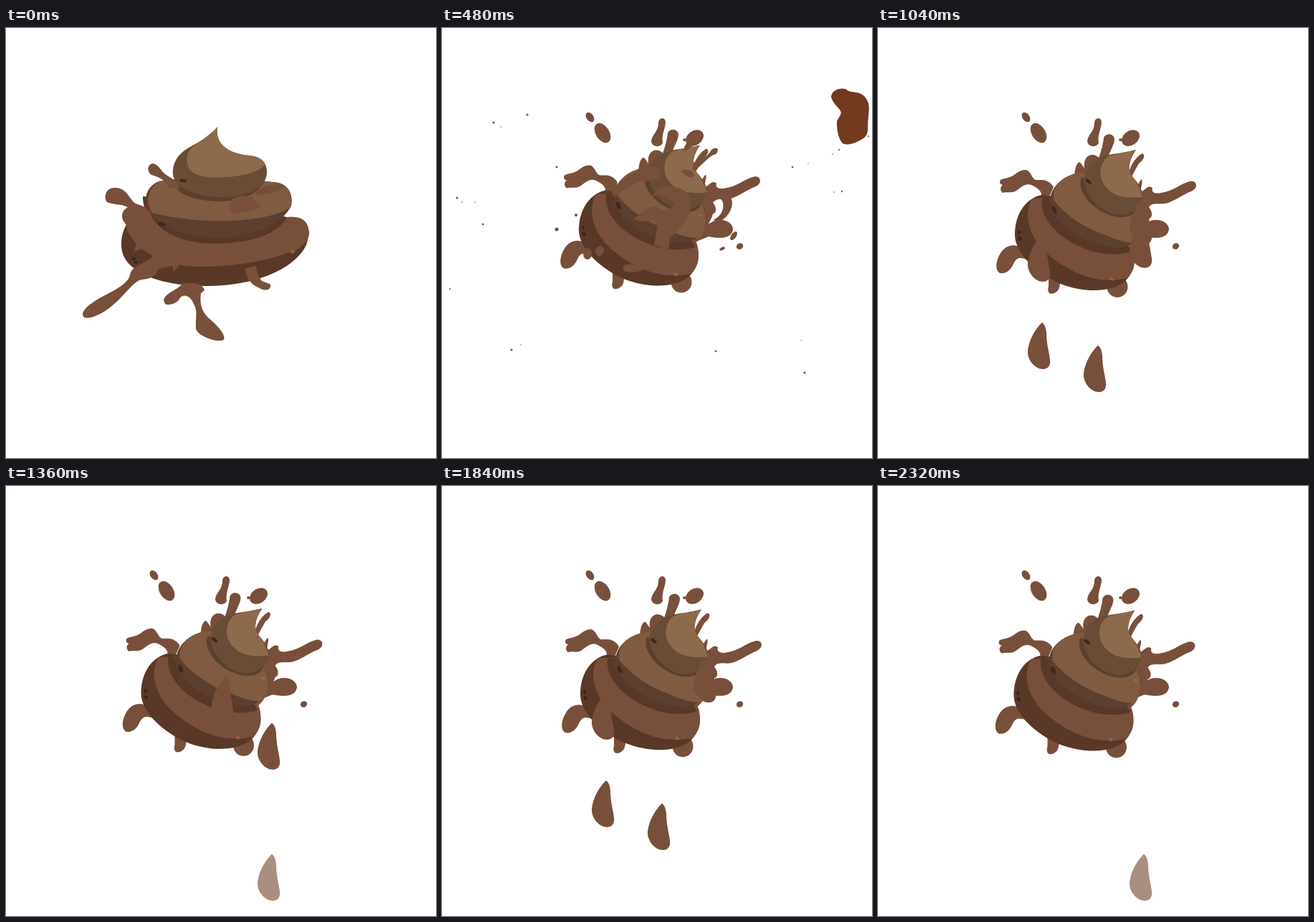
Write an HTML page that moves like this. It is 600 by 600 pixels and loops after 2400 ms.

```html
<!DOCTYPE html>
<html lang="en">
<head>
<meta charset="utf-8">
<title>Splat</title>
<style>
html, body { margin: 0; width: 100%; height: 100%; overflow: hidden; background: #fff; }
svg { display: block; width: 100vw; height: 100vh; }
</style>
</head>
<body>
<svg id="stage" viewBox="0 0 600 600"></svg>
<script>
const LOOP = 2400, STEP = 80;
const MUD = '#784f3a';
const stage = document.getElementById('stage');

function add(parent, tag, attrs) {
  const el = document.createElementNS('http://www.w3.org/2000/svg', tag);
  for (const key in attrs) el.setAttribute(key, attrs[key]);
  parent.appendChild(el);
  return el;
}
const group = (parent, fill = MUD) => add(parent, 'g', { fill });
const path = (parent, d, fill) => add(parent, 'path', fill ? { d, fill } : { d });
const oval = (parent, cx, cy, rx, ry, turn = 0) =>
  add(parent, 'ellipse', { cx, cy, rx, ry, transform: `rotate(${turn} ${cx} ${cy})` });
const clamp = v => Math.max(0, Math.min(1, v));
const span = (t, a, b) => clamp((t - a) / (b - a));
const easeOut = v => 1 - (1 - v) ** 3;
const lerp = (a, b, k) => a + (b - a) * k;
const show = (el, on) => el.setAttribute('display', on ? 'inline' : 'none');

// Interpolates two path strings of the same structure.
function mix(a, b, k) {
  const to = b.match(/-?[\d.]+/g);
  let i = 0;
  return a.replace(/-?[\d.]+/g, n => lerp(+n, +to[i++], k).toFixed(1));
}
const grow = (x, y, s) => `translate(${x} ${y}) scale(${s}) translate(${-x} ${-y})`;

// Splash behind the pile: parts that stay and parts that slide with it.
const fixed = group(stage);
oval(fixed, 206.5, 124.5, 5, 7.5, -35);
oval(fixed, 224, 146.5, 9.5, 15, -32);
path(fixed, 'M302 132C303 124 312 124 312 132C311 142 306 150 308 160C306 167 293 167 292 158C293 148 302 145 302 132Z');
oval(fixed, 352.5, 153.5, 13.5, 10, -35);
oval(fixed, 338.5, 156, 2.5, 2);
oval(fixed, 415.5, 304.5, 4.8, 4.2, -30);
path(fixed, 'M350 276C362 276 372 274 378 270C390 264 406 270 406 281C404 295 386 294 372 291L350 300Z');

const limbs = group(stage);
[
  'M171 212C177 209 183 210 190 205C196 200 204 196 209 199C214 203 215 210 220 212C228 212 238 210 245 222L238 238L228 235C229 227 222 223 214 219C206 216 200 222 193 227C187 231 178 228 174 230C170 227 170 222 174 219C170 218 169 215 171 212Z',
  'M315 153C318 146 329 147 330 155C330 164 322 172 320 186L307 184C311 174 314 162 315 153Z',
  'M274 206C275 196 276 190 281 187C284 189 286 193 288 196C286 184 292 176 300 177C308 178 312 184 310 192L295 212Z',
  'M350 203C352 190 362 178 369 175C374 177 370 185 365 188C360 195 356 205 352 210Z',
  'M355 230C362 222 364 214 368 211C370 216 366 222 367 228C374 226 376 218 383 223C381 229 386 232 395 230C412 228 422 217 435 214C446 212 447 224 437 228C424 233 412 243 400 245C390 246 382 243 378 250C383 256 384 264 378 266C376 275 368 284 360 300L350 310Z',
  'M199 306C189 300 177 304 171 314C164 325 163 338 170 342C180 344 186 336 190 327C194 320 200 320 207 323Z',
  'M238 345L256 352C252 358 256 365 246 370C238 373 236 367 238 360Z'
].forEach(d => path(limbs, d));
oval(limbs, 334, 361, 14.5, 15);

// Pile: [fill, upright shape, tilted shape]
const pile = group(stage);
const tiers = [
  ['#593828',
    'M178 262C160 278 157 305 165 320C180 347 225 360 280 360C345 360 400 338 418 305C430 275 415 262 393 264L205 250Z',
    'M228 233C205 238 190 262 191 290C192 312 215 338 250 355C285 370 325 370 345 353C360 338 360 320 354 304L290 240Z'],
  [MUD,
    'M168 278C175 305 215 333 270 333C320 333 370 325 408 308C420 300 424 290 423 284C421 268 412 262 393 264L205 250Z',
    'M215 238C200 266 215 300 245 322C275 345 310 358 348 349C355 341 358 334 358 325C358 316 357 310 354 304L290 236Z'],
  ['#593828',
    'M191 235C190 262 215 300 290 301C350 300 380 285 392 264L300 240Z',
    'M229 236C224 268 255 298 300 312C320 317 340 317 354 312L320 260Z'],
  ['#5c3f2e',
    'M218 213C195 217 187 245 205 262C225 285 265 293 300 293C345 290 385 275 398 248C402 228 390 215 372 215L290 205Z',
    'M280 202C255 207 237 225 240 249C246 272 285 300 325 306C350 310 366 295 368 277C370 265 367 255 360 250L320 200Z'],
  ['#805a41',
    'M218 213C200 218 192 240 204 258C240 267 280 270 310 269C345 268 380 262 397 250C402 228 390 215 372 215L290 205Z',
    'M280 202C255 207 243 222 245 240C262 262 290 280 315 288C335 297 350 301 361 299C369 285 372 262 360 250L320 200Z'],
  ['#5c3f2e',
    'M233 212C235 235 270 242 300 242C330 241 350 232 360 215Z',
    'M284 208C276 228 300 256 330 263C345 266 360 262 362 250Z'],
  ['#684c35',
    'M295 138C285 150 268 160 255 167C240 175 231 190 233 205C236 225 270 236 300 236C340 236 364 222 364 201C364 186 355 180 340 178C315 176 291 165 295 138Z',
    'M360 170C345 174 330 175 317 178C300 182 286 200 288 215C291 238 315 260 338 261C355 261 367 248 369 235C370 222 358 212 352 203C348 193 353 180 360 170Z'],
  ['#8e6a4c',
    'M295 138C285 150 268 160 262 165C252 172 250 185 255 195C262 208 285 210 305 208C330 207 350 202 362 191C358 182 351 179 340 178C315 176 291 165 295 138Z',
    'M360 170C345 174 330 175 320 180C309 190 308 205 314 216C320 227 330 233 340 235C350 237 360 237 369 236C366 222 358 212 352 203C348 193 353 180 360 170Z']
].map(([fill, a, b]) => ({ el: path(pile, a, fill), a, b }));

// Pores and glints: [fill, rx, ry, upright x y turn, tilted x y turn]
const spots = [
  ['#40291d', 5, 2.3, 247, 213, 5, 293.5, 214, 40],
  ['#40291d', 6, 2.8, 218, 274, 12, 246, 254, 65],
  ['#3d241a', 2.6, 2, 181, 327, 10, 197, 285, 60],
  ['#3d241a', 3.2, 2.2, 178, 322, 10, 198, 294, 50],
  ['#94694c', 3.5, 1.6, 381, 224, -20, 361, 268, 40],
  ['#94634b', 3, 2, 400, 312, -20, 326, 350, 40]
].map(([fill, rx, ry, ...pose]) => ({ el: add(pile, 'ellipse', { fill, rx, ry }), pose }));

// Mud hurled along with the upright pile.
const hurl = group(stage);
[
  'M152 223C140 222 135 236 141 243C150 247 160 245 170 250C160 255 160 267 166 272L182 302L178 312L190 308L205 318C195 330 175 330 173 345C170 356 155 364 140 372C120 382 107 392 107 400C108 410 130 402 145 390C165 375 178 352 190 351C202 350 208 347 213 336L232 332L234 340L244 328L262 299C235 293 208 280 201 257C193 246 184 248 178 243C170 233 166 223 152 223Z',
  'M205 189C197 190 196 200 203 205C212 208 222 210 228 224L242 224C240 210 225 209 218 200C214 194 210 190 205 189Z',
  'M220 380C222 370 235 368 245 358C255 353 275 355 277 366L272 370C270 385 273 395 283 405C295 415 307 428 304 435C295 440 268 430 265 420C264 405 268 395 262 385C258 375 250 370 243 376C240 384 228 388 222 385Z',
  'M334 335C334 348 342 358 352 362C362 368 370 366 369 358C365 354 356 356 354 348C350 342 350 337 349 332Z',
  'M316 238C330 232 335 236 345 235C345 245 355 242 356 250C345 255 330 260 315 258C310 250 314 245 316 238Z'
].forEach(d => path(hurl, d));
path(hurl, 'M346 233C352 221 370 216 388 219C386 227 372 233 346 233Z', '#74503a');

// Mud thrown over the pile at impact.
const burst = group(stage);
[
  'M235 226C252 210 270 202 280 194C292 188 303 192 305 203C303 216 285 212 273 215C258 222 250 232 240 235Z',
  'M293 236C300 217 337 215 347 238C350 258 336 280 318 292L316 309L296 303L299 285C302 279 299 272 296 268C288 270 276 272 266 266C276 264 280 251 298 249C310 258 320 254 324 246C318 236 304 230 293 236Z',
  'M333 200C340 195 350 197 352 206C346 212 340 205 333 200Z',
  'M350 188C362 184 370 180 376 170C384 164 388 170 382 176C372 178 364 192 350 200Z',
  'M338 166C344 160 342 148 352 143C362 141 368 150 361 157C354 160 350 166 338 172Z',
  'M378 235C390 230 404 228 405 244C404 258 396 264 389 270L378 268C388 264 394 254 392 244C390 236 384 238 379 243Z',
  'M252 332C262 327 275 330 285 334C276 342 262 342 254 339Z'
].forEach(d => path(burst, d));
oval(burst, 220, 311, 6, 7, 20);
oval(burst, 203, 315, 6, 8);
oval(burst, 407, 290, 3.5, 7, 35);
oval(burst, 391, 308, 4, 2, -25);

// Flying specks: x, y, radius
const specks = group(stage);
const specData = [
  [72, 132, 1.5], [119, 121, 1.6], [82, 138, .7], [160, 194, 1.4], [21, 237, 1.5],
  [28, 243, .8], [46, 243, .7], [57, 274, 1.4], [11, 364, 1], [97, 449, 1.5],
  [110, 442, .7], [382, 451, 1.3], [501, 436, .7], [506, 481, 1.6], [489, 194, 1.3],
  [511, 189, .7], [545, 176, .8], [554, 170, 1.1], [595, 151, 1], [547, 229, .8],
  [558, 228, 1.2], [160, 281, 2.5], [187, 261, 2]
].map(([x, y, r]) => ({ el: oval(specks, x, y, r, r), x, y }));

const chunk = path(stage, 'M543 96C544 87 554 83 563 85C570 92 580 87 588 94C598 104 596 112 595 124C593 138 597 148 588 154C578 160 567 165 559 161C551 152 551 138 551 130C555 122 559 120 555 114C550 108 545 104 543 96Z', '#733a20');

// Drips: x, resting tip height, release times
const DROP = 'M0 0C-9 8 -20 26 -20 43C-19 54 -9 65 1 65C9 65 12 59 11 52C10 42 6 30 6 14C5 6 3 2 0 0Z';
const dripLayer = group(stage);
const drips = [
  [229, 228, [800, 960, 1600, 1760]],
  [307, 266, [808, 1448, 1608]],
  [371, 237, [997, 1237, 1877, 1957]]
].flatMap(([x, top, times]) => times.map(at => ({ el: path(dripLayer, DROP), x, top, at })));
const HANG = 210, SPEED = 61 / 80;

// Drift of the stuck pile: time, x, y
const drift = [
  [0, 0, 0], [320, 0, -7], [480, 0, -6.5], [1040, 0, 0], [1360, -2.5, .8],
  [1680, 2, .8], [2000, 2, 3.5], [2320, -1.5, 3.5], [2400, -2, 3.5]
];
function driftAt(t) {
  const i = drift.findIndex(p => p[0] > t);
  const [a, b] = [drift[i - 1], drift[i]];
  const v = span(t, a[0], b[0]), k = v * v * (3 - 2 * v);
  return [lerp(a[1], b[1], k), lerp(a[2], b[2], k)];
}

function draw(t) {
  const [dx, dy] = driftAt(t);
  const move = `translate(${dx} ${dy})`;

  const tilt = easeOut(span(t, 0, 320));
  pile.setAttribute('transform', move);
  tiers.forEach(({ el, a, b }) => el.setAttribute('d', mix(a, b, tilt)));
  spots.forEach(({ el, pose: [x0, y0, r0, x1, y1, r1] }) =>
    el.setAttribute('transform',
      `translate(${lerp(x0, x1, tilt)} ${lerp(y0, y1, tilt)}) rotate(${lerp(r0, r1, tilt)})`));

  show(hurl, t < 240);
  hurl.setAttribute('transform', grow(285, 270, 1 - .35 * span(t, 0, 240)));

  const spread = easeOut(span(t, 80, 400));
  [fixed, limbs, burst].forEach(g => show(g, t >= 160));
  fixed.setAttribute('transform', grow(290, 260, spread));
  limbs.setAttribute('transform', `${move} ${grow(290, 260, spread)}`);
  burst.setAttribute('transform', grow(300, 255, spread));
  burst.setAttribute('opacity', 1 - span(t, 500, 720));

  show(specks, t >= 160 && t < 600);
  const fly = (t - 480) / 480;
  specData.forEach(({ el, x, y }) =>
    el.setAttribute('transform', `translate(${(x - 290) * fly} ${(y - 260) * fly})`));

  show(chunk, t >= 240 && t < 640);
  const out = (t - 480) / STEP;
  chunk.setAttribute('transform', `translate(${out * 62} ${out * -34}) ${grow(570, 124, 1 + out * .12)}`);

  drips.forEach(({ el, x, top, at }) => {
    const y = top + Math.max(0, t - at) * SPEED;
    show(el, t >= at - HANG && y < 525);
    el.setAttribute('transform', `translate(${x} ${y})`);
    el.setAttribute('opacity', clamp((555 - y) / 65));
  });
}

const start = performance.now();
function tick(now) {
  const t = Math.max(0, now - start) % LOOP;
  draw(Math.floor(t / STEP) * STEP);
  requestAnimationFrame(tick);
}
draw(0);
requestAnimationFrame(tick);
</script>
</body>
</html>
```
